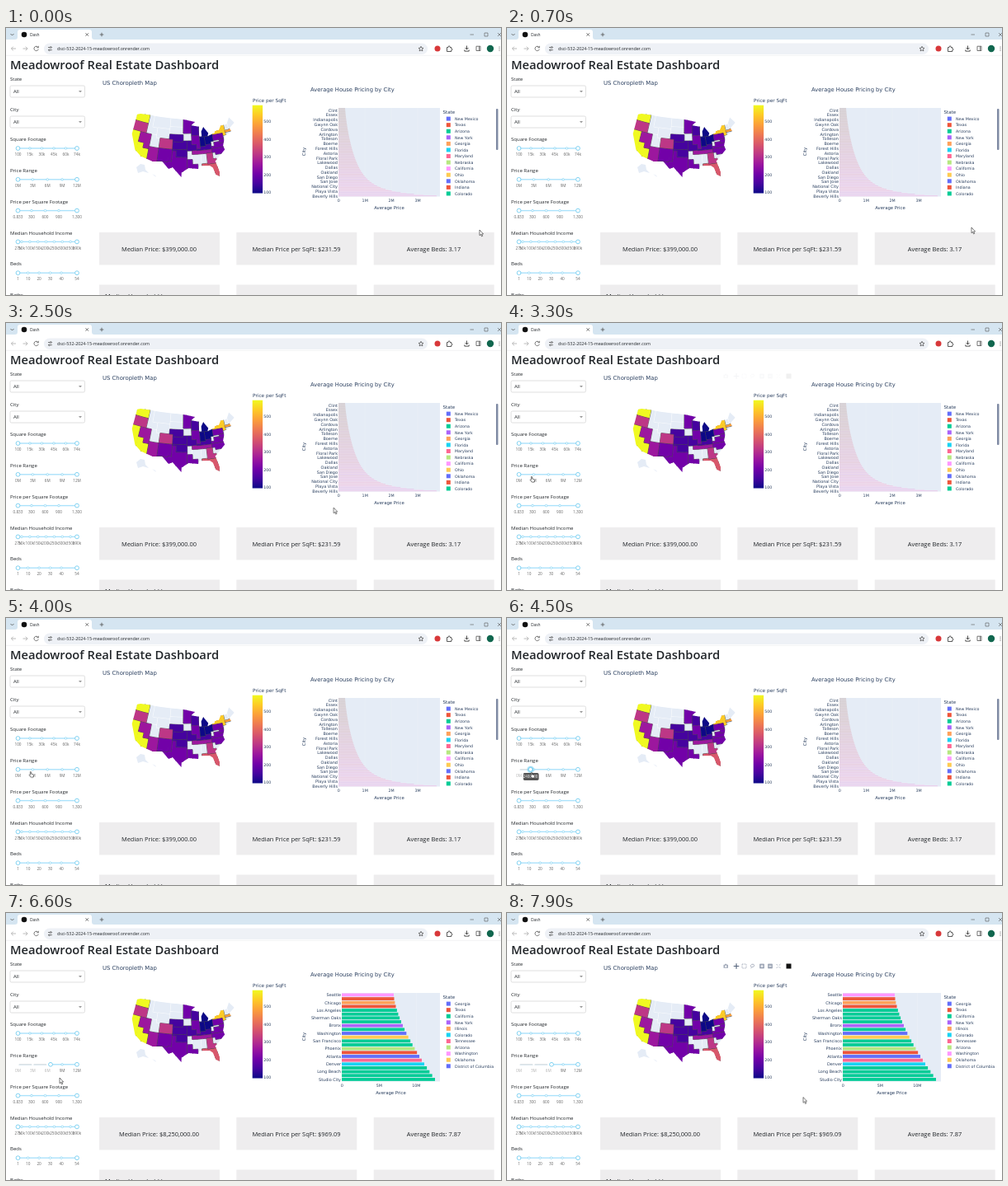
Write an HTML page that moves like this. It is 600 px wide and 324 px high and loops after 8 s.

```html
<!DOCTYPE html>
<html lang="en">
<head>
<meta charset="utf-8">
<title>Dashboard</title>
<style>
@property --h { syntax: "<number>"; inherits: true; initial-value: 14.5; }
@property --v { syntax: "<integer>"; inherits: true; initial-value: 24; }
html, body { margin: 0; width: 100%; height: 100%; overflow: hidden; background: #fff; }
#stage { position: relative; width: 600px; height: 324px; overflow: hidden; animation: drag 8s linear infinite; }
svg { position: absolute; left: 0; top: 0; }
text { font-family: "Open Sans", "Noto Sans", sans-serif; fill: #212529; }
.plot text { font-family: "DejaVu Sans", sans-serif; fill: #2a3f5f; }
.mark { text-anchor: middle; fill: #666; }
.mid { text-anchor: middle; }
.end { text-anchor: end; }
.line { fill: none; stroke: #555; stroke-width: .8; }

/* Hard switches between two states */
.before { --a: 1; --b: 0; }
.after { --a: 0; --b: 1; }
.sqft { animation: sqft 8s step-end infinite; }
.price { animation: price 8s step-end infinite; }
.chart { animation: chart 8s step-end infinite; }
@keyframes sqft { 0% { opacity: var(--a); } 68.75% { opacity: var(--b); } }
@keyframes price { 0% { opacity: var(--a); } 72.5% { opacity: var(--b); } }
@keyframes chart { 0% { opacity: var(--a); } 82.5% { opacity: var(--b); } }

/* Slider drag: --h is the handle position, --v the value in hundred thousands */
@keyframes drag {
  0%, 51.24% { --h: 14.5; --v: 0; }
  51.25%, 56.25% { --h: 28.5; --v: 24; }
  60% { --h: 43; --v: 48; }
  65%, 100% { --h: 54; --v: 66; }
}
#knob { transform: translate(calc(var(--h) * 1px), 183.8px); }
#cover { transform: translate(14.5px, 183.1px) scaleX(calc(var(--h) - 14.5)); }
/* Marks left of the handle go grey */
.live { --on: clamp(0, (var(--x) - var(--h)) * 9 + 1, 1); }
.live circle { stroke-opacity: var(--on); }
.live text { opacity: calc(.5 + var(--on) / 2); }
#halo, #tip { opacity: 0; animation: hold 8s step-end infinite; }
@keyframes hold { 0% { opacity: 0; } 51.25% { opacity: 1; } 67.5% { opacity: 0; } }
#tip {
  position: absolute; left: -9.5px; top: 187.5px; width: 19px; height: 9.8px; border-radius: 1.8px;
  background: #555; color: #fff; font: 4.4px/9.8px "Open Sans", sans-serif; text-align: center;
  transform: translateX(calc(var(--h) * 1px));
}
#tip::after { counter-reset: v var(--v); content: counter(v) "00000"; }

#bar { opacity: 0; animation: bar 8s linear infinite; }
@keyframes bar {
  0%, 32.5% { opacity: 0; }
  36%, 38.75% { opacity: 1; }
  41.25% { opacity: .06; }
  46.25%, 93.75% { opacity: 0; }
  97.5%, 100% { opacity: 1; }
}

#cursor { animation: move 8s linear infinite; }
@keyframes move {
  0% { transform: translate(574px, 245px); }
  8.75% { transform: translate(563px, 242px); }
  18.75% { transform: translate(515.5px, 236.5px); }
  26.25%, 28.75% { transform: translate(503px, 235px); }
  40%, 48.75% { transform: translate(29px, 186px); }
  56.25% { transform: translate(29px, 187px); }
  65% { transform: translate(54px, 191px); }
  71.25% { transform: translate(55px, 191.5px); }
  75%, 92.5% { transform: translate(65px, 200px); }
  98.75%, 100% { transform: translate(359px, 223.5px); }
}
#arrow { animation: arrow 8s step-end infinite; }
#hand { animation: hand 8s step-end infinite; }
@keyframes arrow { 0% { opacity: 1; } 40% { opacity: 0; } 67.5% { opacity: 1; } }
@keyframes hand { 0% { opacity: 0; } 40% { opacity: 1; } 67.5% { opacity: 0; } }
</style>
</head>
<body>
<div id="stage">
<svg id="page" width="600" height="324" viewBox="0 0 600 324">
  <!-- browser -->
  <rect width="600" height="20" fill="#d5e5f1"/>
  <path d="M11 14q3 0 3-3V5q0-3 3-3H101q3 0 3 3V11q0 3 3 3H600V33H0V14z" fill="#fff"/>
  <rect x="46" y="18.5" width="465" height="13.5" rx="6.7" fill="#eef1f6"/>
  <path d="M0 33.3H600" stroke="#e8eaec" stroke-width=".6"/>
  <circle cx="22" cy="8" r="3.3" fill="#111"/>
  <text x="29" y="10" font-size="4.9">Dash</text>
  <text x="62" y="27.4" font-size="5.3">dsci-532-2024-15-meadowroof.onrender.com</text>
  <g class="line">
    <path d="M5.5 7l2 2 2-2M96.500 6.200l3.600 3.600m0-3.600l-3.600 3.600M113.700 8h4.600m-2.300-2.300v4.600"/>
    <path d="M12 25H6.500m2.300-2.400L6.400 25l2.400 2.400M20.500 25H26m-2.300-2.400L26.100 25l-2.400 2.400" stroke="#aaa"/>
    <path d="M39 23.500a2.700 2.700 0 1 0 .3 2.200M39.300 21.800v2h-2"/>
    <path d="M51 23.500h2.300m1.800 0h.7M51 26.700h.7m1.800 0h2.300"/>
    <circle cx="54.300" cy="23.500" r=".9"/><circle cx="52.500" cy="26.700" r=".9"/>
    <path d="M503 22.300l.9 1.900 2.100.2-1.600 1.400.5 2.100-1.900-1.100-1.900 1.100.5-2.100-1.600-1.400 2.100-.2z"/>
    <path d="M534.500 23.500h1.500q0-1.700 1.100-1.700t1.100 1.700h1.500v1.500q1.300 0 1.300 1t-1.300 1v1.500h-5.200z" stroke="#333"/>
    <path d="M558.500 21.500v4.500m-2-2l2 2 2-2m-4.700 2.500v1.600h5.400v-1.600" stroke="#222"/>
    <path d="M570 22.200h5v5.300h-5zM573.500 22.200v5.300"/>
    <path d="M562.500 8h4.500M580 6h4v4h-4zM596 6l4 4m0-4l-4 4" stroke-width=".6"/>
  </g>
  <circle cx="523" cy="25" r="3.500" fill="#d8383a"/>
  <circle cx="587" cy="25" r="4.200" fill="#11674f"/>
  <path d="M598 22.600v.9m0 1.200v.9m0 1.200v.9" stroke="#555"/>

  <text x="5" y="50.200" font-size="14.700" font-weight="600">Meadowroof Real Estate Dashboard</text>
  <g id="side"></g>
  <g id="cards"></g>
  <g class="plot">
    <text x="117" y="69" font-size="6.850">US Choropleth Map</text>
    <text x="369" y="77" font-size="6.750">Average House Pricing by City</text>
    <g id="map"></g>
    <g id="scale"></g>
    <g id="chartA" class="chart before"></g>
    <g id="chartB" class="chart after"></g>
    <g id="bar" fill="none" stroke="#a3abba" stroke-width=".9">
      <path d="M262.500 62.800h1.300l.6-1h1.600l.6 1h1.400v3.900h-5.500z" fill="#a3abba" stroke="none"/>
      <circle cx="265.200" cy="64.700" r="1.200" fill="#fff" stroke="none"/>
      <path d="M278 61.200v6.600M274.700 64.500h6.600" stroke="#59677f" stroke-width="1.200"/>
      <rect x="285" y="62" width="5" height="5" stroke-dasharray="1 .6"/>
      <path d="M295.500 67q1.600-.4.500-1.600-1.700-2 .7-3.200 3-.6 3 1.600-.4 2-2.900 1.800"/>
      <path d="M306.500 62h5v5h-5zM316.500 62h5v5h-5z" fill="#a3abba"/>
      <path d="M307.500 64.500h3m-1.500-1.500v3M317.500 64.500h3" stroke="#fff"/>
      <path d="M326.500 62l5 5m0-5l-5 5" stroke-dasharray="2.300 2.400"/>
      <rect x="338.500" y="61.500" width="6" height="6" fill="#111" stroke="none"/>
    </g>
  </g>
</svg>
<div id="tip"></div>
<svg width="600" height="324" viewBox="0 0 600 324">
  <g id="cursor" fill="#fff" stroke="#222" stroke-width=".6" stroke-linejoin="round">
    <path id="arrow" d="M0 0v6.700l1.500-1.300 1.100 2.500 1.100-.5-1.100-2.400h2z"/>
    <path id="hand" d="M.3.500q.8-.6 1.200.2v2.300l2.500.6q.8.300.6 1.200l-.5 2.300H1.200L-.9 4.500q0-.8 1.200-.2z"/>
  </g>
</svg>
</div>
<script>
const el = id => document.getElementById(id);
const text = (x, y, size, str, cls = '', attrs = '') => `<text x="${x}" y="${y}" font-size="${size}" class="${cls}" ${attrs}>${str}</text>`;
const rect = (x, y, w, h, fill, attrs = '') => `<rect x="${x}" y="${y}" width="${w}" height="${h}" fill="${fill}" ${attrs}/>`;

// Sidebar
const LEFT = 14.5, RIGHT = 86;
const dropdown = (label, y) => text(5, y, 6, label) +
  rect(5, y + 6, 90.5, 14, '#fff', 'rx="1.6" stroke="#ccc" stroke-width=".6"') +
  text(9, y + 15.2, 6, 'All') +
  `<path d="M88 ${y + 12}h4l-2 2.200z" fill="#999"/>`;

const knob = (x, y) => `<circle cx="${x}" cy="${y}" r="2.400" fill="#fff" stroke="#74cdf0" stroke-width=".9"/>`;
const amount = s => parseFloat(s.replace(',', '')) * (s.endsWith('k') ? 1000 : 1);

// Marks sit in proportion to their values
function slider(label, row, names, live) {
  const y = 146 + row * 37.8, marks = names.split(' '), values = marks.map(amount);
  const min = values[0], span = values.at(-1) - min;
  let out = text(5, y - 8.800, 6, label) + rect(LEFT, y - .7, RIGHT - LEFT, 1.400, '#abe2fb');
  if (live) out += '<rect id="cover" width="1" height="1.400" fill="#e4e4e4"/>';
  marks.forEach((name, i) => {
    const x = LEFT + (values[i] - min) / span * (RIGHT - LEFT);
    out += `<g class="${live ? 'live' : ''}" style="--x:${x}"><circle cx="${x}" cy="${y}" r="1.300" fill="#fff" stroke="#83d3f2" stroke-width=".7"/>` +
      text(x, y + 9.2, 4.7, name, 'mark') + '</g>';
  });
  const low = live ? `<g id="knob"><circle id="halo" r="4" fill="#74cdf0" fill-opacity=".7"/>${knob(0, 0)}</g>` : knob(LEFT, y);
  return out + low + knob(RIGHT, y);
}

el('side').innerHTML = dropdown('State', 64) + dropdown('City', 101) +
  slider('Square Footage', 0, '100 15k 30k 45k 60k 74k') +
  slider('Price Range', 1, '0M 3M 6M 9M 12M', true) +
  slider('Price per Square Footage', 2, '0.833 300 600 900 1,300') +
  slider('Median Household Income', 3, '27k 50k 100k 150k 200k 250k 300k 350k 390k') +
  slider('Beds', 4, '1 10 20 30 40 54') +
  text(5, 326, 6, 'Baths');

// Summary cards
const CARD = 7.45;
const swap = (x, kind, a, b) => text(x, 271, CARD, a, `mid ${kind} before`) + text(x, 271, CARD, b, `mid ${kind} after`);
el('cards').innerHTML = [113, 279.3, 445.7].map(x => rect(x, 248, 146, 39.500, '#eeedee') + rect(x, 311.5, 146, 20, '#eeedee')).join('') +
  swap(185.5, 'price', 'Median Price: $399,000.00', 'Median Price: $8,250,000.00') +
  swap(352, 'sqft', 'Median Price per SqFt: $231.59', 'Median Price per SqFt: $969.09') +
  swap(518.5, 'price', 'Average Beds: 3.17', 'Average Beds: 7.87') +
  text(120, 328, CARD, 'Median Household Income');

// Map: Albers projection of degrees west and north
const RAD = Math.PI / 180, N = .60285, C = 1.35124;
function project(west, north) {
  const rho = 172 * Math.sqrt(C - 2 * N * Math.sin(north * RAD)) / N, a = N * (96 - west) * RAD;
  return (216 + rho * Math.sin(a)).toFixed(1) + ' ' + (rho * Math.cos(a) - 78).toFixed(1);
}
const COAST = '124.7 48.4,122.8 49,95.2 49,89.6 48,92 46.7,87.5 46,87.8 42,86.4 42,86.4 44,85 45.6,82.6 43,83.3 41.7,79 42.7,79 43.3,76.5 43.5,75 45,71.5 45,69.2 47.4,67 44.8,70.5 43.2,70 41.7,74 40.6,76 37,75.6 35.3,81.2 31.5,80 26.8,80.4 25.2,81.8 26,82.7 29,84 30,89 30.3,89.5 29.1,94 29.6,97.2 27.8,97.3 25.9,101.4 29.8,103.2 29,106.5 31.8,111 31.3,117.1 32.5,120.6 34.5,124.3 40.3';
// Strips from west to east: western edge, then states downwards with their southern edge; lower case has no data
const STRIPS = `125 WA46 OR42 CA30
120 WA46 OR42 NV38 CA30
117 id42 NV36 CA30
114 mt45 id42 ut37 AZ30
111 mt45 wy41 ut37 AZ30
109 mt45 wy41 CO37 NM31.7 TX25
104 nd46 sd43 NE41 CO37 NM32 TX25
102 nd46 sd43 NE40 KS37 OK36.5 TX25
100 nd46 sd43 NE40 KS37 OK34 TX25
96.5 MN43.5 ia40.5 KS37 OK34 TX25
94.5 MN43.5 ia40.5 MO36.5 ar33 LA28
92 MN46.8 WI42.5 IL39 MO36.5 TN35 ms31 LA28
89.5 WI42.5 IL37 KY36.5 TN35 ms28
87.6 MI41.7 IN38 KY36.5 TN35 al31 FL25
84.9 MI41.7 OH38.6 KY36.5 TN35 GA30.7 FL25
82 OH39.5 wv37.5 VA36.5 NC35 sc32.5 GA30.7 FL25
80.5 NY42 PA39.7 wv39 VA36.5 NC34 sc32 FL25
77.5 NY42 PA39.7 MD38.3 VA36.5 NC33
75 NY41 nj38
73.4 vt42.8 MA42 ct40
71 me43 MA42 ct40
67`.split('\n').map(line => line.split(' '));
const PLASMA = '#0d0887 #46039f #7201a8 #9c179e #bd3786 #d8576b #ed7953 #fb9f3a #fdca26 #f0f921'.split(' ');
const STEPS = ['MI IN OH', 'KS NE OK MO WI KY', 'NM TX MN IL LA NC VA PA MD', 'NV AZ TN', 'OR CO GA', 'FL', '', 'MA', 'NY', 'WA CA'];

const cells = {};
STRIPS.slice(0, -1).forEach(([west, ...stack], i) => {
  const east = STRIPS[i + 1][0];
  let north = 49.5;
  for (const item of stack) {
    const name = item.slice(0, 2), south = +item.slice(2);
    const corners = [[west, north], [east, north], [east, south], [west, south]];
    cells[name] = (cells[name] || '') + 'M' + corners.map(p => project(...p)).join('L') + 'z';
    north = south;
  }
});
const isBlank = name => name === name.toLowerCase();
const drawState = name => {
  const fill = isBlank(name) ? '#e5ecf6' : PLASMA[STEPS.findIndex(s => s.includes(name))];
  return `<path d="${cells[name]}" fill="${fill}" stroke="${isBlank(name) ? '#fff' : '#444'}" stroke-width=".8" paint-order="stroke"/>`;
};
const names = Object.keys(cells);
const coast = 'M' + COAST.split(',').map(p => project(...p.split(' '))).join('L') + 'z';
el('map').innerHTML = `<clipPath id="coast"><path d="${coast}"/></clipPath><g clip-path="url(#coast)">` +
  [...names.filter(isBlank), ...names.filter(n => !isBlank(n))].map(drawState).join('') + '</g>' +
  '<path fill="#e5ecf6" d="M158 169l5-4 5 1 1 6 4 4-7-2-6 2zM177 177l4 2 1 2z"/>';

el('scale').innerHTML = '<defs><linearGradient id="plasma" x2="0" y1="1" y2="0">' +
  PLASMA.map((c, i) => `<stop offset="${i / 9}" stop-color="${c}"/>`).join('') + '</linearGradient></defs>' +
  rect(298.7, 93.7, 12.4, 106.8, 'url(#plasma)') + text(299, 90, 5.8, 'Price per SqFt') +
  [500, 400, 300, 200, 100].map((n, i) => text(312.3, 115.2 + i * 21.5, 4.7, n)).join('');

// Bar charts
const COLORS = '#636efa #ef553b #00cc96 #ab63fa #ffa15a #19d3f3 #ff6692 #b6e880 #ff97ff #fecb52'.split(' ');
const TOP = 97, BOTTOM = 204.5, EDGE = 526;

function chart({ left, cities, first, step, ticks, tickGap, states, bars }) {
  const tickX = i => left + .3 + i * tickGap;
  const labels = ticks.split(' ');
  return rect(left, TOP, EDGE - left, BOTTOM - TOP, '#e5ecf6') +
    labels.map((_, i) => `<path d="M${tickX(i)} ${TOP}V${BOTTOM}" stroke="#ecf1f8" stroke-width=".4"/>`).join('') + bars +
    cities.split(',').map((c, i) => text(left - 1, first + i * step + 1.7, 4.95, c, 'end')).join('') +
    labels.map((n, i) => text(tickX(i), 210.8, 4.8, n, 'mid')).join('') +
    text((left + EDGE) / 2, 219.6, 5.35, 'Average Price', 'mid') +
    text(0, 0, 5.35, 'City', 'mid', 'transform="translate(363 150) rotate(-90)"') +
    text(529.5, 103.8, 5.5, 'State') +
    states.split(',').map((s, i) => rect(533.8, 107.6 + i * 7.57, 5, 5, COLORS[i % 10]) + text(544, 111.9 + i * 7.57, 4.75, s)).join('');
}

// Hundreds of thin bars blend into pale rows, pinker towards the dearer cities
let seed = 7;
const random = () => (seed = seed * 16807 % 2147483647) / 2147483647;
let thin = '';
for (let i = 0; i < 107; i++) {
  const u = i / 106, width = 3 + 14 * u ** 1.5 + 5.3 / (1.052 - u);
  const hue = 340 - 40 * u + 30 * (random() - .5), light = 80 + 6 * u + 5 * (i % 2);
  thin += rect(403, TOP + .2 + i, width, 1.050, `hsl(${hue} ${8 + 40 * u}% ${light}%)`);
}
el('chartA').innerHTML = chart({
  left: 403, first: 100, step: 5.78, bars: thin, ticks: '0 1M 2M 3M', tickGap: 31.9,
  cities: 'Clint,Essex,Indianapolis,Gwynn Oak,Cordova,Arlington,Tolleson,Boerne,Forest Hills,Astoria,Floral Park,Lakewood,Dallas,Oakland,San Diego,San Jose,National City,Playa Vista,Beverly Hills',
  states: 'New Mexico,Texas,Arizona,New York,Georgia,Florida,Maryland,Nebraska,California,Ohio,Oklahoma,Indiana,Colorado'
}) + rect(594, 98, 2.500, 50, '#808ba4', 'rx="1"');

// One legend colour index per bar
const thick = [...'81412222320922710652222'].map((c, i) =>
  rect(407, 97.5 + i * 4.66, 63 + 50 * (i / 22) ** 1.5, 3.800, COLORS[c])).join('');
el('chartB').innerHTML = chart({
  left: 407, first: 99.5, step: 9.32, bars: thick, ticks: '0 5M 10M', tickGap: 45,
  cities: 'Seattle,Chicago,Los Angeles,Sherman Oaks,Bronx,Washington,San Francisco,Phoenix,Atlanta,Denver,Long Beach,Studio City',
  states: 'Georgia,Texas,California,New York,Illinois,Colorado,Tennessee,Arizona,Washington,Oklahoma,District of Columbia'
});
</script>
</body>
</html>
```
